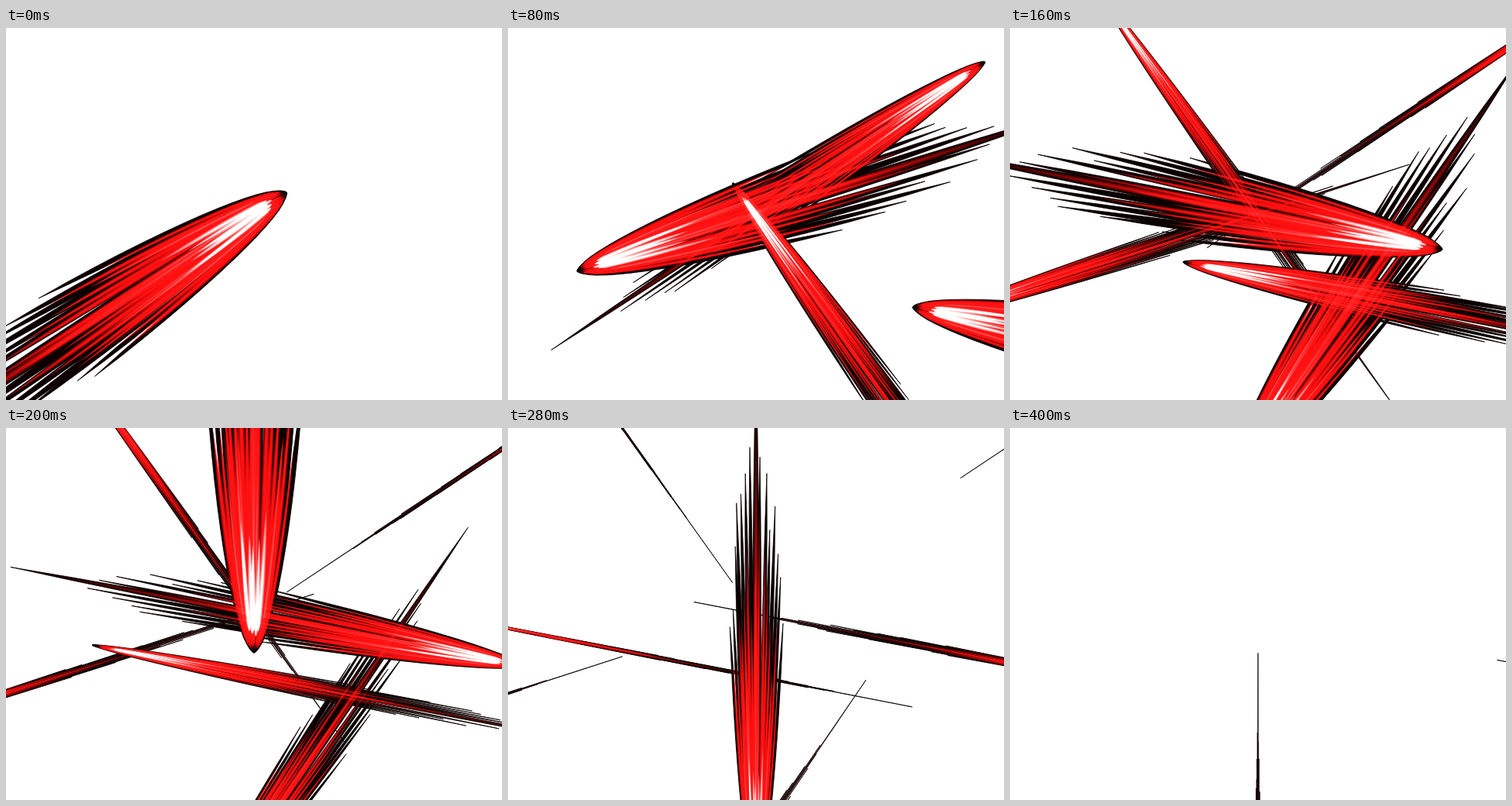
Animation, 640 px wide and 480 px high, one loop 0.44 s. Source, as an HTML page with a canvas:

```html
<!DOCTYPE html>
<html>
<head>
<meta charset="utf-8">
<title>Red slashes</title>
<style>
  html, body { margin: 0; width: 100%; height: 100%; overflow: hidden; background: #fff; }
  canvas { display: block; }
</style>
</head>
<body>
<canvas id="stage" width="640" height="480"></canvas>
<script>
const ctx = document.getElementById('stage').getContext('2d');
const STEP = 40, STEPS = 11, LIFE = 8, LENGTH = 672;

// A slash bursts forward, settles to an even speed and thins out
const travel = age => 134 * age + 200 * age * Math.exp(-1.2 * age);
const thickness = age => Math.max(.05, Math.exp(-((age / 2.6) ** 2)));

const slash = (start, x, y, degrees, width = 1) => ({ start, x, y, angle: degrees * Math.PI / 180, width });
const slashes = [
  slash(0, 362, 212, -33.6),
  slash(1, 274, 254, 162.1),
  slash(2, 290, 200, 234.5, .42),
  slash(2, 522, 360, 191, .85),
  slash(3, 367, 249, 10.9),
  slash(3, 389, 432, 124.3),
  slash(5, 320, 290, 90)
];

let seed = 11;
const random = (lo, hi) => {
  seed = (seed * 16807) % 2147483647;
  return lo + (hi - lo) * seed / 2147483647;
};

// One bristle of the brush, fanning back from the tip at the origin
function strand(lane, half, from, to) {
  const path = new Path2D(), n = 16;
  const point = (i, side) => {
    const k = (i / n) ** 2, d = from + (to - from) * k;
    const spread = lane + side * half * (1 - k) ** .8 * Math.min(1, 4 * i / n);
    path.lineTo(-d, spread * 2.3 * d ** .58);
  };
  for (let i = 0; i <= n; i++) point(i, -1);
  for (let i = n; i >= 0; i--) point(i, 1);
  path.closePath();
  return path;
}

// Colour that stays even up to one distance and is gone at another
function fade(rgb, alpha, hold, end) {
  const gradient = ctx.createLinearGradient(0, 0, -LENGTH, 0);
  gradient.addColorStop(hold / LENGTH, `rgba(${rgb},${alpha})`);
  gradient.addColorStop(end / LENGTH, `rgba(${rgb},0)`);
  return gradient;
}
const red = fade('255,14,14', .3, 260, 640);
const white = fade('255,240,240', .28, 90, 230);
const pink = fade('255,90,90', .2, 120, 340);

const dark = new Path2D();
const light = [];
// Nested layers give soft edges
const glow = (fill, lane, half, from, to) => {
  for (let part = 1; part > 0; part -= .25) light.push([fill, strand(lane, half * part, from, to)]);
};

dark.addPath(strand(0, .2, 0, LENGTH));
glow(red, 0, .16, 6, LENGTH * .96);
for (let i = 0; i < 15; i++) {
  const lane = (i / 7 - 1) * .9 + random(-.03, .03);
  const reach = 350 + 310 * (1 - Math.abs(lane)) ** .8 * random(.4, 1) + random(-70, 50);
  dark.addPath(strand(lane, .15, 0, reach));
  glow(red, lane * .94, random(.11, .18), random(3, 10), reach * random(.62, .95));
}
for (let i = -2; i <= 2; i++) {
  glow(white, i * .17 + random(-.04, .04), random(.14, .2), random(12, 30), random(125, 220));
}
for (let i = 0; i < 7; i++) {
  glow(pink, random(-.65, .65), .05, random(20, 60), random(230, 360));
}

function eachSlash(step, paint) {
  for (const { start, x, y, angle, width } of slashes) {
    const age = step - start;
    if (age < 0 || age >= LIFE) continue;
    ctx.save();
    ctx.translate(x, y);
    ctx.rotate(angle);
    ctx.translate(travel(age), 0);
    ctx.scale(1, width * thickness(age));
    paint();
    ctx.restore();
  }
}

function paintDark() {
  const placed = new Path2D();
  placed.addPath(dark, ctx.getTransform());
  ctx.resetTransform();
  ctx.fill(placed);
  ctx.stroke(placed);
}

function paintLight() {
  for (const [fill, path] of light) {
    ctx.fillStyle = fill;
    ctx.fill(path);
  }
}

function draw(now) {
  const step = Math.floor(now / STEP) % STEPS;
  ctx.globalCompositeOperation = 'source-over';
  ctx.fillStyle = '#fff';
  ctx.fillRect(0, 0, 640, 480);
  ctx.fillStyle = ctx.strokeStyle = '#0c0000';
  ctx.lineWidth = .8;
  eachSlash(step, paintDark);
  // Colour adds up where slashes cross
  ctx.globalCompositeOperation = 'lighter';
  eachSlash(step, paintLight);
  requestAnimationFrame(draw);
}
requestAnimationFrame(draw);
</script>
</body>
</html>
```
